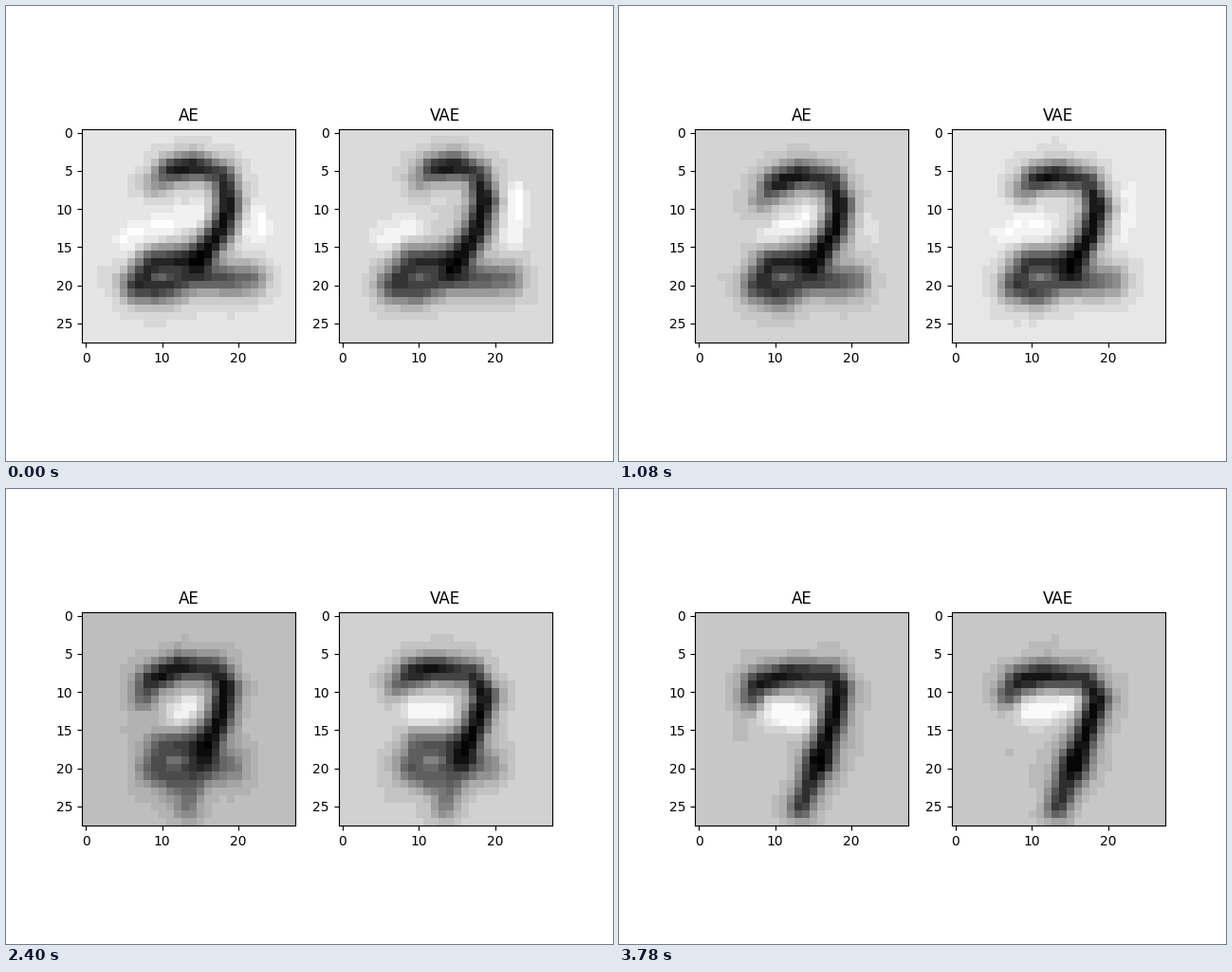
These frames come from a looping animation (640x480 px, 3.84 s). A matplotlib script:

```python
import numpy as np
import matplotlib.pyplot as plt
from matplotlib.animation import FuncAnimation

FRAMES, INTERVAL = 64, 60
SIZE = 28
STEP = 0.05   # spacing of the grey levels
MIDWAY = 0.55  # time of the pose between the two and the seven
PAPER_TIMES = [0, 0.1, 0.4, 0.55, 0.73, 1]
gy, gx = np.mgrid[0:SIZE, 0:SIZE].astype(float)


def smoothstep(u):
    u = np.clip(u, 0, 1)
    return u * u * (3 - 2 * u)


def blend(poses, t):
    """Point list at time t, from the poses at 0, MIDWAY and 1."""
    first, middle, last = (np.array(p, float) for p in poses)
    if t < MIDWAY:
        return first + (middle - first) * t / MIDWAY
    return middle + (last - middle) * (t - MIDWAY) / (1 - MIDWAY)


def stroke(points, pen, shade=lambda s: 1 + 0 * s):
    """Soft line through points; shade gives its darkness from 0 to 1 along it."""
    s = np.linspace(0, 1, 100)
    knots = np.linspace(0, 1, len(points))
    x, y = (np.interp(s, knots, c)[:, None, None] for c in np.array(points, float).T)
    dist2 = (gx - x) ** 2 + (gy - y) ** 2
    line = 0.9 * np.exp(-dist2 / (2 * pen ** 2)) + 0.1 * np.exp(-dist2 / (8 * pen ** 2))
    return (shade(s)[:, None, None] * line).max(axis=0)


def soft_noise(rng):
    n = rng.normal(size=(SIZE, SIZE))
    n = sum(np.roll(n, (i, j), (0, 1)) for i in (-1, 0, 1) for j in (-1, 0, 1)) / 3
    return 0.017 * n * np.exp(-((gx - 13.5) ** 2 + (gy - 13.5) ** 2) / 160)


class Digit:
    """A blurred two that turns into a seven."""

    # The loop and tail under the two, which shrink below the stem.
    wide_foot = [(14.5, 17), (9, 17.2), (6.8, 20), (9.5, 20.4), (14, 18.8), (19, 19.3), (21.5, 19.2)]
    small_foot = [(15, 17.2), (10, 17.3), (9, 20), (11.5, 21.3), (14, 19.5), (17, 19.6), (19, 19.8)]

    def __init__(self, paper, stems, bowls, gap, foot_ink, seed):
        self.paper, self.stems, self.bowls = paper, stems, bowls
        self.gap = stroke(gap, 0.9)
        self.foot_ink = foot_ink
        rng = np.random.default_rng(seed)
        self.noise = soft_noise(rng), soft_noise(rng)

    def ink(self, t):
        def stem_shade(s):
            hook = 1 - (0.65 - 0.3 * t) * np.exp(-(s / 0.14) ** 2)
            return hook * (0.96 - 0.2 * np.exp(-((s - 0.47) / 0.13) ** 2))

        path = blend(self.stems, t)
        stem = stroke(path, 1.2, stem_shade)
        leg = stroke([path[-1], (13.3, 25.1)], 1.15, lambda s: 1 - 0.2 * s)
        foot = stroke(blend([self.wide_foot, self.small_foot, self.small_foot], t),
                      1.45, lambda s: 1 - 0.4 * s ** 2)
        leg_ink = 0.9 * smoothstep((t - 0.35) / 0.55)
        foot_ink = self.foot_ink * (1 - t ** 3)
        return 1 - (1 - stem) * (1 - leg_ink * leg) * (1 - foot_ink * foot)

    def draw(self, t):
        bg = np.interp(t, PAPER_TIMES, self.paper)
        turn = t * np.pi / 2
        paper = bg + np.cos(turn) * self.noise[0] + np.sin(turn) * self.noise[1]
        paper -= (0.14 + 0.16 * t) * stroke(blend(self.bowls, t), 1.1)
        paper -= 0.2 * (1 - t) ** 3 * self.gap
        ink = self.ink(t)
        tone = ink + (1 - ink) * np.clip(paper, 0, 1)
        tone = bg + np.round((tone - bg) / STEP) * STEP
        return np.clip(tone, 0, 1)


# Stems run from the hook at the left, over the arch, down to the foot.
ae = Digit(
    paper=[0.105, 0.11, 0.205, 0.227, 0.285, 0.22],
    stems=[
        [(9, 6.8), (11, 5.1), (14.3, 4.5), (18, 5.7), (18.7, 9.5), (17.9, 12.5), (14.6, 17)],
        [(7.8, 10.5), (8.7, 8.4), (12.2, 6.6), (16.8, 7), (18.4, 9.5), (17.8, 13), (15.4, 17.6)],
        [(7, 10.8), (7.6, 8.9), (12, 7.7), (17.2, 7.8), (18.4, 9.5), (17.5, 14), (15.8, 19)],
    ],
    bowls=[[(6, 14), (14.5, 10.7)], [(13, 13.7), (14, 11)], [(9, 12), (13.3, 13.6)]],
    gap=[(22, 10.5), (22, 12.5)], foot_ink=0.86, seed=4)

vae = Digit(
    paper=[0.145, 0.11, 0.09, 0.145, 0.225, 0.22],
    stems=[
        [(10, 6.2), (11.8, 4.9), (14.8, 4.4), (17.6, 5.5), (18.6, 9), (17.4, 13.3), (14.3, 17.9)],
        [(7.3, 8.7), (9, 7.3), (12.5, 6.8), (17, 7.5), (18.6, 10.5), (17.6, 14), (15.8, 18)],
        [(7, 10.2), (8.2, 8.5), (12, 7.8), (17, 8.3), (18.6, 11), (17.3, 14.8), (15.5, 19.5)],
    ],
    bowls=[[(6, 14), (9, 12.5)], [(9.5, 12.5), (13, 12.5)], [(9.5, 12.5), (15, 11.6)]],
    gap=[(22.5, 8), (22.2, 13.5)], foot_ink=0.8, seed=9)

fig, axes = plt.subplots(1, 2, figsize=(6.4, 4.8), dpi=100)
panels = []
for ax, digit, title in zip(axes, [ae, vae], ["AE", "VAE"]):
    panels.append((ax.imshow(digit.draw(0), cmap="gray_r", vmin=0, vmax=1), digit))
    ax.set_title(title)


def update(frame):
    for image, digit in panels:
        image.set_data(digit.draw(frame / (FRAMES - 1)))
    return [image for image, _ in panels]


anim = FuncAnimation(fig, update, frames=FRAMES, interval=INTERVAL, repeat=True, repeat_delay=0)
plt.show()
```
